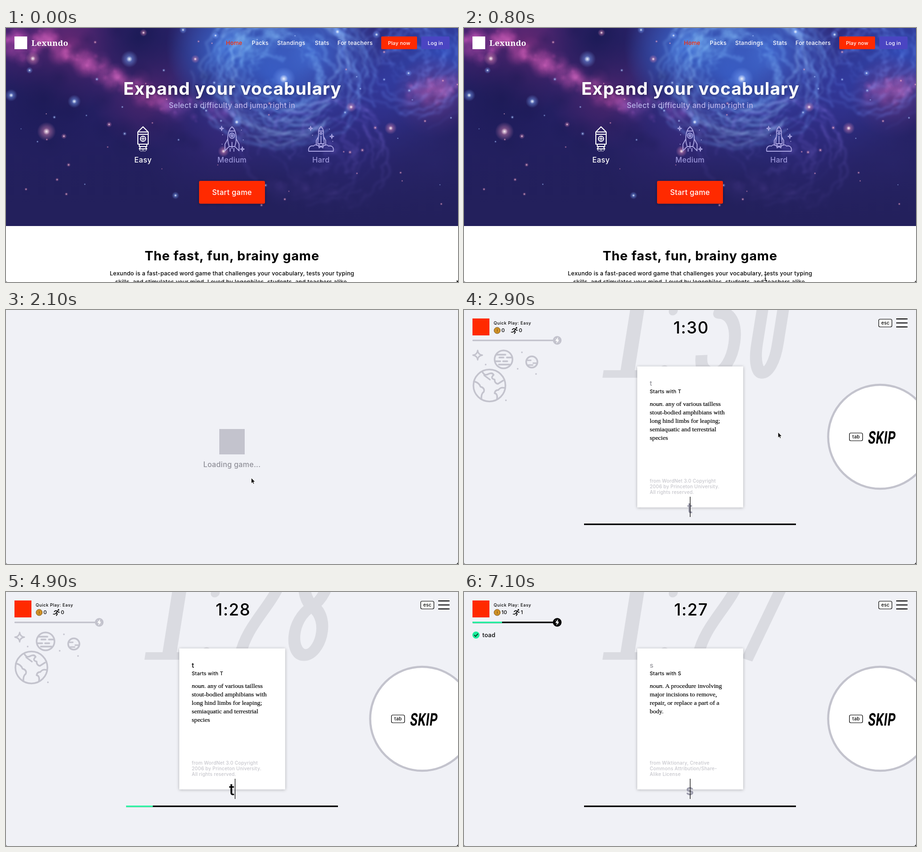
An HTML page with a canvas that plays this animation: 960 by 540 pixels, repeating every 7200 ms.

```html
<!DOCTYPE html>
<html lang="en">
<head>
<meta charset="utf-8">
<title>Word game</title>
<style>
html, body { margin: 0; width: 100%; height: 100%; overflow: hidden; background: #f0f1f6; }
canvas, svg { position: absolute; left: 0; top: 0; display: block; }
text { font-family: Inter, sans-serif; font-weight: 500; letter-spacing: .02em; white-space: pre; }
.m { text-anchor: middle; }
.title { font-weight: 700; letter-spacing: .03em; }
.serif text, text.serif { font-family: "Liberation Serif", serif; letter-spacing: 0; }
.line { fill: none; stroke-linecap: round; stroke-linejoin: round; }
.nav { font-size: 12px; fill: #fff; }
.mid { font-size: 15.6px; fill: #fff; }
.hide { display: none; }
</style>
</head>
<body>
<canvas id="sky" width="960" height="421"></canvas>
<svg width="960" height="540" viewBox="0 0 960 540">
  <defs>
    <filter id="lift" x="-10%" y="-10%" width="120%" height="120%">
      <feDropShadow dx="0" dy="1" stdDeviation="3" flood-color="#222" flood-opacity=".28"/>
    </filter>
    <filter id="glow" x="-10%" y="-30%" width="120%" height="160%">
      <feDropShadow dx="0" dy="1" stdDeviation="3" flood-color="#000" flood-opacity=".35"/>
    </filter>
  </defs>

  <g id="home">
    <rect y="421" width="960" height="119" fill="#fff"/>
    <rect x="18" y="18" width="27" height="27" fill="#fff"/>
    <text x="54" y="38" font-size="17" fill="#fff" style="font-family:'Noto Serif',serif;font-weight:800">Lexundo</text>
    <g class="nav">
      <text x="467" y="36" fill="#ff2a00">Home</text>
      <text x="522" y="36">Packs</text>
      <text x="576" y="36">Standings</text>
      <text x="656" y="36">Stats</text>
      <text x="704" y="36">For teachers</text>
    </g>
    <rect x="797" y="18" width="76" height="27" rx="2" fill="#ff2a00"/>
    <rect x="882" y="18" width="60" height="27" rx="2" fill="#4a45c2"/>
    <g class="m" font-size="10.7" fill="#fff">
      <text x="835" y="35.5">Play now</text>
      <text x="912" y="35.5">Log in</text>
    </g>
    <text class="m title" x="481" y="142" font-size="37" fill="#fff" filter="url(#glow)">Expand your vocabulary</text>
    <text class="m" x="480" y="169.500" font-size="15.5" fill="#b9b4ea">Select a difficulty and jump right in</text>

    <g class="line" stroke="#fff" stroke-width="2">
      <path d="M280 221L291 210L302 221ZM280 221V247H302V221M280 226H302M283 247V252H299V247M286 252L283 257H299L296 252"/>
      <circle cx="291" cy="235.500" r="5.500"/>
      <path d="M291 232V239M287.500 235.500H294.500M284 259V260M291 259V262M298 259V260M287 261V262M295 261V262" stroke-width="1.600"/>
    </g>
    <g class="line" stroke="#aaa4e2" stroke-width="1.800">
      <path d="M480 210C470 218 469 238 474 252H486C491 238 490 218 480 210ZM474 219H486M471 236L465 247V261L474 252M489 236L495 247V261L486 252M480 243V256M476 256V262M484 256V262"/>
      <circle cx="480" cy="229" r="5.500"/><circle cx="480" cy="229" r="2"/>
      <path id="spark" d="M458 209Q458 213.500 462 213.500Q458 213.500 458 218Q458 213.500 454 213.500Q458 213.500 458 209Z"/>
      <use href="#spark" x="44" y="44"/>
      <path d="M460 227V227.100M500 217V217.100M504 238V238.100M459 247V247.100"/>
    </g>
    <g class="line" stroke="#aaa4e2" stroke-width="1.800">
      <path d="M669 209.500C664 214 663 220 664 226L662 246H676L674 226C675 220 674 214 669 209.500ZM664 219H674M663 232L659 239V249H662M675 232L679 239V249H676M669 230V246M665 246V251H673V246"/>
      <path d="M643 262C641 254 647 249 653 251C657 246 665 249 665 255C667 252 671 252 673 255C673 249 681 246 685 251C692 249 697 254 695 262Z"/>
      <circle cx="669" cy="224" r="2"/>
      <use href="#spark" x="189"/><use href="#spark" x="234" y="17"/>
      <path d="M651 228V228.100M687 215V215.100M694 241V241.100"/>
    </g>
    <g class="m mid">
      <text x="291" y="286">Easy</text>
      <text x="480" y="286" style="fill:#9a94d8">Medium</text>
      <text x="669" y="286" style="fill:#9a94d8">Hard</text>
    </g>
    <rect id="start" x="410" y="325" width="140" height="48.500" rx="3" filter="url(#glow)"/>
    <text class="m mid" x="480" y="354.500">Start game</text>

    <text class="m title" x="480" y="494" font-size="27.400">The fast, fun, brainy game</text>
    <g class="m" font-size="12.100">
      <text x="480" y="526">Lexundo is a fast-paced word game that challenges your vocabulary, tests your typing</text>
      <text x="480" y="544">skills, and stimulates your mind. Loved by logophiles, students, and teachers alike.</text>
    </g>
    <g id="status">
      <path d="M-2 542V524H315Q319 524 319 528V542Z" fill="#fff" stroke="#c4c4c8" filter="url(#lift)"/>
      <text x="2" y="535" font-size="9.300" fill="#66676b" style="font-family:Roboto,sans-serif;font-weight:400;letter-spacing:0">https://playlexundo.com/play/easy</text>
    </g>
  </g>

  <g id="load">
    <rect width="960" height="540" fill="#f0f1f6"/>
    <rect x="453" y="253" width="54" height="54" fill="#c3c3cd"/>
    <text class="m" x="480" y="334" font-size="15.300" fill="#8f8f98">Loading game...</text>
  </g>

  <g id="game">
    <rect width="960" height="540" fill="#f0f1f6"/>
    <g class="line" transform="translate(0 144) skewX(-9)" stroke="#dadbe1" stroke-width="25" style="stroke-linecap:butt">
      <path d="M294 -8H395" stroke-width="16"/>
      <path d="M345 -8V-232L312 -190" stroke-width="30"/>
      <path d="M422 -17V-17.100M422 -142V-142.100" stroke-width="19" stroke-linecap="round" style="stroke-linecap:round"/>
      <path id="tens"/><path id="ones"/>
    </g>
    <rect x="18" y="18" width="36" height="36" fill="#ff2a00"/>
    <text x="63" y="31" font-size="9" style="letter-spacing:.06em">Quick Play: Easy</text>
    <circle cx="70.500" cy="43.500" r="6.600" fill="#e0a02c" stroke="#6b4712"/>
    <circle cx="70.500" cy="43.500" r="4.300" fill="none" stroke="#a8701a"/>
    <path d="M70.500 41V46" stroke="#6b4712" stroke-width="1.400"/>
    <text id="coins" x="79.500" y="47" font-size="11"></text>
    <g id="streak">
      <circle cx="111.500" cy="38" r="1.700"/>
      <path class="line" d="M109.500 40.500L106.500 44.500L109 46.500L107 50M106.500 44.500L104 47H100.500M109 40.500L105 39.500L102.500 42M109.500 40.500L111 43H113.500" stroke="#000" stroke-width="1.700"/>
      <text id="runs" x="116.500" y="47" font-size="11"></text>
    </g>
    <rect id="track" x="18" y="63" width="175" height="3.200" rx="1"/>
    <rect id="level" x="18" y="63" height="3.200" rx="1" fill="#23f0a0"/>
    <circle id="knob" cx="198" cy="64.500" r="9.200"/>
    <path d="M199.500 58.500L194.500 65.500H198L196.500 70.500L201.500 63.500H198.500ZM193.500 60L202.500 69" fill="#fff" stroke="#fff" stroke-width=".7"/>
    <g id="space" class="line" stroke="#c3c3cd" stroke-width="3.400">
      <path d="M29 86Q30 95 39 96Q30 97 29 106Q28 97 19 96Q28 95 29 86Z" stroke-width="2.800"/>
      <circle cx="84" cy="105" r="19"/>
      <path d="M69 95H88M75 101H84M91 101H101M66 109H77M83 109H92M74 116H97"/>
      <circle cx="144" cy="110.500" r="12"/>
      <path d="M133 107H142M147 113H155M137 117H146" stroke-width="2.800"/>
      <circle cx="54" cy="160.500" r="34"/>
      <path d="M39 131Q43 141 52 136Q60 132 63 138Q55 145 65 148Q65 156 72 157L83 150M21 152Q32 154 35 163Q45 166 42 174Q36 178 37 190M87 166Q78 163 73 170Q66 170 65 177Q72 178 70 190M43 139L55 148"/>
      <path d="M46 116V116.100M123 90V90.100M114 125V125.100M153 136V136.100M89 192V192.100"/>
    </g>
    <g id="solved">
      <circle cx="25.500" cy="91.500" r="7.600" fill="#1cec9c"/>
      <path class="line" d="M22 91.800L24.600 94.400L29.300 89" stroke="#000" stroke-width="1.400"/>
      <text x="39" y="95.500" font-size="12.500">toad</text>
    </g>
    <text id="clock" class="m" x="482.500" y="49.500" font-size="35" style="letter-spacing:.04em"></text>
    <g class="m" font-size="10">
      <rect x="880.800" y="19.500" width="28" height="16.500" rx="3" fill="#fff" stroke="#000" stroke-width="1.200"/>
      <text x="895" y="31">esc</text>
      <circle cx="884" cy="269.500" r="110.500" fill="#fff" stroke="#c3c3cd" stroke-width="4.500"/>
      <rect x="818.600" y="261.500" width="28" height="16.500" rx="3" fill="#fff" stroke="#000" stroke-width="1.200"/>
      <text x="832.700" y="273.200">tab</text>
    </g>
    <path d="M918 19H942M918 27.500H942M918 36H942" stroke="#000" stroke-width="2.200"/>
    <text transform="matrix(.7 0 -.12 1 857 283.500)" font-size="37" style="font-family:Roboto,sans-serif;font-weight:600">SKIP</text>

    <rect x="368" y="120" width="225" height="299.500" fill="#fff" filter="url(#lift)"/>
    <text id="hint" x="394.500" y="160.500" font-size="14.500"></text>
    <text id="clue" x="394.500" y="177" font-size="10.600"></text>
    <g id="def" class="serif" font-size="13.400" stroke="#000" stroke-width=".2"></g>
    <g id="credit" font-size="10" fill="#c6c6cc"></g>
    <text id="word" class="m" x="480" y="431.500"></text>
    <rect id="caret" y="397" width="1.200" height="43"/>
    <rect x="255" y="454" width="450" height="3.200"/>
    <rect id="bar" x="255" y="454" height="3.200" fill="#2cf5a4"/>
  </g>

  <path d="M960 535Q960 540 955 540H960Z"/>
  <path d="M0 536Q0 540 4 540H0Z" fill="#777"/>

  <g id="arrow"><path d="M0 0V11.500L2.600 9.200L4.300 13L6.200 12.200L4.500 8.500H8Z" stroke="#fff" stroke-width=".8"/></g>
  <g id="beam"><path class="line" d="M-2.500 -5.500Q0 -5.500 0 -4Q0 -5.500 2.500 -5.500M0 -4V5M-2.500 6.500Q0 6.500 0 5Q0 6.500 2.500 6.500M-1.200 2.500H1.200" stroke="#000" stroke-width="1.100"/></g>
  <g id="hand"><path d="M-1.300 1Q0 -.8 1.200 1V5L5.500 6Q6.800 6.500 6.500 8.500L5.500 13H-.5L-4.200 7.500Q-4 5.800 -1.300 8Z" fill="#fff" stroke="#000"/></g>
</svg>

<script>
const LOOP = 7200, HOVER = 1180, LOAD = 1500, PLAY = 2550, NEXT = 6050, HIDE = 4780;
const KEYS = [4800, 5100, 5350, 5600], WORD = 'toad';
const TICKS = [3900, 4900, 5900];
const MOVES = [[0, 957, 535], [250, 957, 535], [800, 640, 530], [1220, 519, 357], [1300, 519, 357],
  [1500, 521, 357], [2100, 521, 357], [2400, 722, 122], [2800, 667, 260], [LOOP, 667, 260]];
const CARDS = [
  { first: 't',
    def: ['any of various tailless', 'stout-bodied amphibians with', 'long hind limbs for leaping;', 'semiaquatic and terrestrial', 'species'],
    credit: ['from WordNet 3.0 Copyright', '2006 by Princeton University.', 'All rights reserved.'] },
  { first: 's',
    def: ['A procedure involving', 'major incisions to remove,', 'repair, or replace a part of a', 'body.'],
    credit: ['from Wiktionary, Creative', 'Commons Attribution/Share-', 'Alike License'] }
];
const TENS = {
  3: 'M495 -225H560L520 -138C578 -138 572 -10 530 -10C506 -10 498 -25 497 -48',
  2: 'M502 -170C502 -252 562 -246 558 -178C554 -120 500 -80 496 -10H560'
};
const ONES = {
  0: 'M611 -170C611 -255 655 -255 655 -170V-72C655 10 611 10 611 -72Z',
  9: 'M655 -160C655 -255 611 -255 611 -175C611 -95 655 -95 655 -160V-72C655 10 611 0 611 -52',
  8: 'M633 -114C595 -140 600 -230 633 -230C666 -230 671 -140 633 -114C588 -84 602 -10 633 -10C664 -10 678 -84 633 -114Z',
  7: 'M601 0L673 -225H600'
};

const $ = id => document.getElementById(id);
const show = (id, on) => $(id).classList.toggle('hide', !on);
const clamp = v => Math.min(1, Math.max(0, v));
const mix = (a, b, k) => a + (b - a) * k;
const ease = k => k * k * (3 - 2 * k);

function paintSky() {
  const g = $('sky').getContext('2d');
  let seed = 11;
  const rnd = () => (seed = (seed * 16807) % 2147483647) / 2147483647;
  const spread = n => (rnd() + rnd() - 1) * n;
  const blob = (x, y, r, color, alpha = 1) => {
    const f = g.createRadialGradient(x, y, 0, x, y, r);
    f.addColorStop(0, color);
    f.addColorStop(.35, color + '99');
    f.addColorStop(1, color + '00');
    g.globalAlpha = alpha;
    g.fillStyle = f;
    g.fillRect(x - r, y - r, 2 * r, 2 * r);
  };
  const ridge = (x0, y0, x1, y1, color, n, wide) => {
    for (let i = 0; i < n; i++) {
      const k = rnd();
      blob(mix(x0, x1, k) + spread(wide), mix(y0, y1, k) + spread(wide), 5 + rnd() * 20, color, .1 + rnd() * .16);
    }
  };
  const wisps = (cx, cy, low, high, color, n) => {
    g.strokeStyle = color;
    for (let i = 0; i < n; i++) {
      let a = rnd() * 6.28, r = mix(low, high, rnd());
      g.globalAlpha = .08 + rnd() * .2;
      g.lineWidth = 1.5 + rnd() * 7;
      g.beginPath();
      for (let j = 0; j < 14; j++) {
        g.lineTo(cx + Math.cos(a) * r, cy + Math.sin(a) * r * .85);
        a += .07;
        r += spread(11);
      }
      g.stroke();
    }
  };
  const base = g.createLinearGradient(0, 0, 0, 421);
  base.addColorStop(0, '#2b2269');
  base.addColorStop(.5, '#231f62');
  base.addColorStop(1, '#22205a');
  g.fillStyle = base;
  g.fillRect(0, 0, 960, 421);
  [[130, 30, 150, '#6d2874'], [20, 20, 110, '#4f2370'], [300, 140, 120, '#582770'], [280, 20, 110, '#1b1a55'],
   [80, 150, 130, '#1b1a55'], [570, 100, 230, '#3459c6'], [470, 40, 130, '#3f70da'], [650, 50, 150, '#4470d8'],
   [800, 120, 180, '#3440aa'], [930, 50, 150, '#3452c4'], [910, 145, 90, '#6c3886'], [720, 260, 200, '#342f8c'],
   [460, 240, 170, '#3a2a80'], [910, 290, 150, '#2c2872']].forEach(b => blob(...b, .85));

  g.globalCompositeOperation = 'screen';
  g.filter = 'blur(2px)';
  g.lineJoin = g.lineCap = 'round';
  wisps(590, 95, 60, 190, '#4f86f0', 130);
  wisps(590, 95, 110, 175, '#79aaff', 45);
  wisps(850, 60, 30, 150, '#4468e0', 75);
  wisps(660, 260, 30, 150, '#5a48b4', 50);
  g.filter = 'none';
  ridge(0, 20, 70, 60, '#a02d72', 45, 30);
  ridge(70, 25, 200, 85, '#b83270', 75, 26);
  ridge(190, 80, 340, 165, '#a8306c', 75, 24);
  ridge(330, 160, 490, 185, '#7c3690', 45, 28);
  ridge(850, 130, 950, 130, '#a83c7c', 45, 35);
  ridge(570, 330, 780, 375, '#4b3186', 45, 35);
  ridge(480, 40, 590, 10, '#4d8df0', 35, 30);
  g.globalCompositeOperation = 'source-over';

  for (let i = 0; i < 22; i++) blob(spread(280) + 230, rnd() * 250, 12 + rnd() * 24, '#17174f', .28);
  const fade = g.createLinearGradient(0, 190, 0, 421);
  fade.addColorStop(0, '#23205c00');
  fade.addColorStop(1, '#23205c');
  g.globalAlpha = 1;
  g.fillStyle = fade;
  g.fillRect(0, 190, 960, 231);

  const star = (x, y, r, color) => {
    blob(x, y, r, color, .75);
    blob(x, y, r * .35, '#ffffff', .9);
  };
  [[57, 65, 15], [86, 220, 20], [402, 66, 9], [733, 168, 11], [817, 213, 13], [462, 262, 12], [219, 205, 6],
   [292, 10, 8], [123, 230, 6]].forEach(s => star(...s, '#e08ab8'));
  [[262, 66, 18], [11, 143, 13], [145, 156, 14], [50, 90, 7], [376, 4, 8], [704, 8, 12], [787, 14, 9],
   [590, 108, 25], [490, 200, 12], [360, 356, 8], [445, 16, 8], [855, 96, 7]].forEach(s => star(...s, '#7eaaff'));
  for (let i = 0; i < 65; i++) star(rnd() * 960, rnd() * 380, 1.5 + rnd() * 3, rnd() < .5 ? '#e58cb4' : '#91b4ff');
}

let current;
function setCard(card) {
  if (card === current) return;
  current = card;
  $('clue').textContent = 'Starts with ' + card.first.toUpperCase();
  $('def').innerHTML = card.def.map((s, i) =>
    `<text x="394.5" y="${203.5 + 18 * i}">${i ? '' : '<tspan font-style="italic">noun.</tspan> '}${s}</text>`).join('');
  $('credit').innerHTML = card.credit.map((s, i) => `<text x="394.5" y="${366.5 + 12 * i}">${s}</text>`).join('');
}

function drawGame(t) {
  const done = t >= NEXT, card = CARDS[+done];
  const typed = done ? '' : WORD.slice(0, KEYS.filter(k => t >= k).length);
  const left = 30 - TICKS.filter(k => t >= k).length;
  setCard(card);
  $('clock').textContent = '1:' + left;
  $('tens').setAttribute('d', TENS[Math.floor(left / 10)]);
  $('ones').setAttribute('d', ONES[left % 10]);

  $('hint').textContent = typed || card.first;
  $('hint').setAttribute('fill', typed ? '#000' : '#96969c');
  const word = $('word');
  word.textContent = typed || card.first;
  word.setAttribute('fill', typed ? '#000' : '#9c9cac');
  word.style.fontSize = typed ? '34px' : '30px';
  word.style.fontWeight = typed ? 500 : 700;
  $('caret').setAttribute('x', 479.8 + (typed ? word.getComputedTextLength() / 2 : 0));
  const focus = [PLAY, ...KEYS, NEXT].filter(k => t >= k).pop();
  show('caret', (t - focus) % 1000 < 500);
  const part = done ? 0 : KEYS.reduce((sum, k) => sum + clamp((t - k) / 200), 0) / KEYS.length;
  $('bar').setAttribute('width', 450 * part);

  $('coins').textContent = done ? '10' : '0';
  $('runs').textContent = done ? '1' : '0';
  $('streak').setAttribute('transform', `translate(${done ? 4 : 0} 0)`);
  $('track').setAttribute('fill', done ? '#000' : '#c3c3cd');
  $('knob').setAttribute('fill', done ? '#000' : '#c3c3cd');
  $('level').setAttribute('width', 63 * ease(clamp((t - NEXT) / 300)));
  show('space', !done);
  show('solved', done);
}

function drawPointer(t) {
  const i = MOVES.findIndex(m => m[0] > t);
  const [t0, x0, y0] = MOVES[i - 1], [t1, x1, y1] = MOVES[i];
  const k = ease((t - t0) / (t1 - t0));
  const kind = t >= 650 && t < 900 ? 'beam' : t >= HOVER && t < LOAD ? 'hand' : 'arrow';
  for (const id of ['arrow', 'beam', 'hand']) show(id, id === kind && t < HIDE);
  $(kind).setAttribute('transform', `translate(${mix(x0, x1, k)} ${mix(y0, y1, k)})`);
}

function draw(t) {
  show('home', t < LOAD);
  show('load', t >= LOAD && t < PLAY);
  show('game', t >= PLAY);
  show('status', t >= HOVER);
  $('start').setAttribute('fill', t >= HOVER ? '#ff4522' : '#ff2a00');
  if (t >= PLAY) drawGame(t);
  drawPointer(t);
}

paintSky();
const begin = performance.now();
function tick() {
  draw((performance.now() - begin) % LOOP);
  requestAnimationFrame(tick);
}
tick();
</script>
</body>
</html>
```
